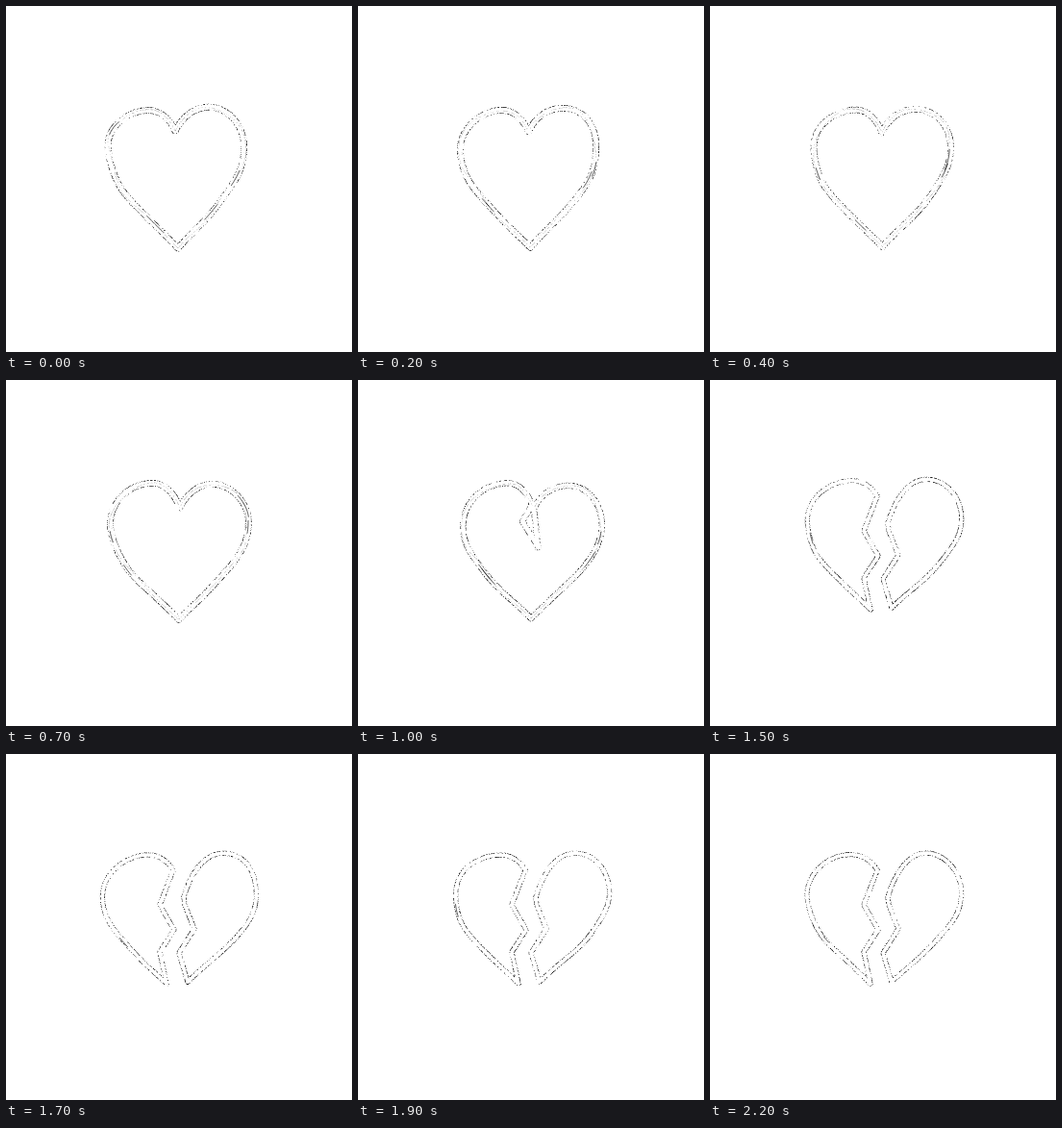
Write an HTML page with a canvas that moves like this. It is 360 by 360 pixels and loops after 2300 ms.

```html
<!DOCTYPE html>
<html lang="en">
<head>
<meta charset="utf-8">
<title>Breaking heart</title>
<style>
  html, body { margin: 0; width: 100%; height: 100%; overflow: hidden; background: #fff; }
  canvas { display: block; width: 360px; height: 360px; }
</style>
</head>
<body>
<canvas id="stage" width="360" height="360"></canvas>
<script>
const SIZE = 360, STEP = 100, STEPS = 23;
const CRACK_START = 8, SPLIT_START = 12, SPLIT_END = 15;
const ctx = document.getElementById('stage').getContext('2d', { alpha: false, willReadFrequently: true });

// Each half runs notch, top, side, tip; its crack runs from notch to tip
const HALVES = [
  {
    whole: [[176,130], [148,109], [106,147], [179,252]],
    wide: [[181,130], [155,107], [110,152], [180,248]],
    broken: [[174,121], [147,105], [101,148], [167,239]],
    crackShut: [[171,147], [187,173], [174,204]],
    crackOpen: [[160,157], [175,183], [160,206]]
  },
  {
    whole: [[176,130], [213,105], [247,147], [179,252]],
    wide: [[183,134], [217,110], [254,147], [180,248]],
    broken: [[185,149], [226,103], [261,144], [189,237]],
    crackShut: [[185,152], [187,174], [177,205]],
    crackOpen: [[186,157], [196,182], [180,207]]
  }
];

const mix = (a, b, t) => a + (b - a) * t;
const mixPoints = (p, q, t) => p.map((a, i) => [mix(a[0], q[i][0], t), mix(a[1], q[i][1], t)]);
const progress = (v, from, to) => Math.min(1, Math.max(0, (v - from) / (to - from)));

function hash(x, y, z) {
  let h = Math.imul(x, 374761393) + Math.imul(y, 668265263) + Math.imul(z, 1442695041);
  h = Math.imul(h ^ (h >>> 13), 1274126177);
  h = Math.imul(h ^ (h >>> 15), 2246822519);
  return ((h ^ (h >>> 16)) >>> 0) / 4294967296;
}

function bezier(a, b, c, d, n, out) {
  for (let i = 0; i < n; i++) {
    const t = i / n, u = 1 - t;
    out.push([0, 1].map(k =>
      u * u * u * a[k] + 3 * u * u * t * b[k] + 3 * u * t * t * c[k] + t * t * t * d[k]));
  }
}

function outline([[nx, ny], [tx, ty], [sx, sy], [px, py]]) {
  const pts = [], dx = px - sx, dy = py - sy;
  bezier([nx, ny], [mix(nx, tx, .2), mix(ny, ty, .6)], [mix(tx, nx, .45), ty], [tx, ty], 20, pts);
  bezier([tx, ty], [mix(tx, sx, .55), ty], [sx, mix(sy, ty, .55)], [sx, sy], 30, pts);
  bezier([sx, sy], [sx, sy + .4 * dy], [px - .48 * dx, py - .35 * dy], [px, py], 65, pts);
  pts.push([px, py]);
  return pts;
}

// Bends a line by a smooth hand tremor that fades out at both ends
function wobble(pts, amp, seed) {
  return pts.map(([x, y], i) => {
    const a = amp * Math.sin(Math.PI * i / (pts.length - 1));
    return [x + a * Math.sin(i * .13 + seed), y + a * Math.cos(i * .17 + seed * 2)];
  });
}

function stroke(pts, width, color) {
  ctx.beginPath();
  pts.forEach(p => ctx.lineTo(p[0], p[1]));
  ctx.lineWidth = width;
  ctx.strokeStyle = color;
  ctx.stroke();
}

// Breaks the clean lines into fine specks, denser in some patches
function grain(step) {
  const img = ctx.getImageData(0, 0, SIZE, SIZE), px = img.data;
  for (let y = 90; y < 265; y++) {
    for (let x = 85; x < 275; x++) {
      const i = (y * SIZE + x) * 4;
      if (px[i] === 255) continue;
      const n = .65 * hash(x, y, step + 40) + .2 * hash(x >> 1, y >> 1, step + 1) + .15 * hash(x >> 4, y >> 4, step);
      const v = n < .48 ? 255 : 255 - (255 - px[i]) * Math.min(1, 1.3 * n * n + .1);
      px[i] = px[i + 1] = px[i + 2] = v;
    }
  }
  ctx.putImageData(img, 0, 0);
}

// Short dark strokes inside the band, mostly on the long sides
function pencilMarks(halves, step) {
  const count = step < SPLIT_START ? 4 : 1;
  for (let i = 0; i < count; i++) {
    const line = halves[i % 2];
    const from = Math.floor(line.length * mix(.3, .85, hash(i, 3, step)));
    const part = line.slice(from, from + 6 + Math.floor(9 * hash(i, 7, step)));
    const shift = mix(-1.5, 1.5, hash(i, 11, step));
    stroke(part.map(([x, y]) => [x + shift, y]), .9, 'rgba(0,0,0,.7)');
  }
}

function draw(step) {
  ctx.fillStyle = '#fff';
  ctx.fillRect(0, 0, SIZE, SIZE);
  ctx.lineJoin = ctx.lineCap = 'round';

  const split = progress(step, SPLIT_START, SPLIT_END);
  const cracked = Math.min(4, Math.max(0, step - CRACK_START));
  const halves = [], cracks = [];
  HALVES.forEach((half, side) => {
    const closed = mixPoints(half.whole, half.wide, progress(step, 0, 10));
    const pose = mixPoints(closed, half.broken, split);
    halves.push(wobble(outline(pose), .7, step * 1.7 + side));
    if (cracked) {
      const inner = mixPoints(half.crackShut, half.crackOpen, split);
      cracks.push([pose[0], ...inner, pose[3]].slice(0, cracked + 1));
    }
  });

  const lines = [...halves, ...cracks];
  const band = mix(6, 4.4, progress(step, CRACK_START, SPLIT_END));
  lines.forEach(l => stroke(l, band + .8, '#000'));
  lines.forEach(l => stroke(l, band - .8, '#fff'));
  if (step < SPLIT_START) {
    halves.forEach((h, side) => stroke(wobble(h, 2, step * 2.3 + side), .6, '#888'));
  }
  grain(step);
  pencilMarks(halves, step);
}

let shown = -1;
function tick() {
  const step = Math.floor(performance.now() / STEP) % STEPS;
  if (step !== shown) draw(shown = step);
  requestAnimationFrame(tick);
}
tick();
</script>
</body>
</html>
```
